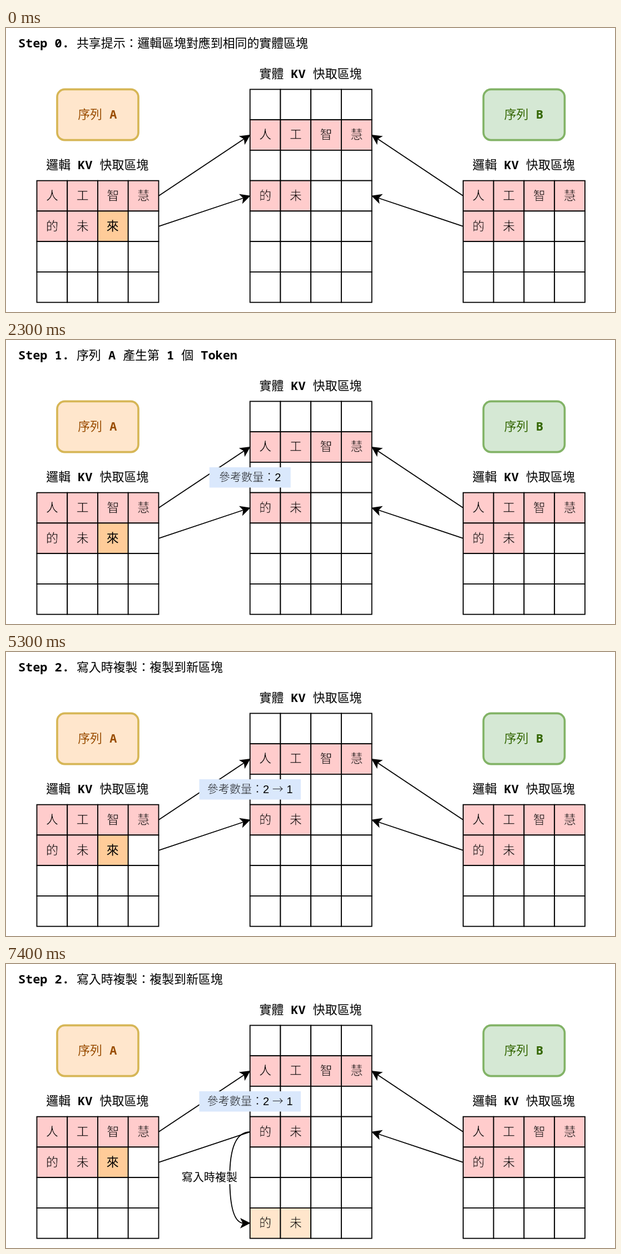
An HTML page for the animation above (8 s loop, 1095x511 px).

```html
<!DOCTYPE html>
<html lang="zh-Hant-TW">
<head>
<meta charset="utf-8">
<style>
  html, body { margin: 0; width: 100%; height: 100%; overflow: hidden; background: #fff; }
  svg { display: block; width: 1095px; height: 511px; }
  text { font: 400 24px 'Noto Sans CJK TC', 'Noto Sans CJK', sans-serif; white-space: pre; text-anchor: middle; }
  .small { font-size: 22px; }
  .start { text-anchor: start; }
  .thin { font-weight: 300; stroke-width: .6; }
  .thin tspan { font-family: 'Liberation Sans', sans-serif; stroke: none; }
  .bold tspan { font-family: 'Noto Sans Mono', monospace; font-weight: 700; }
</style>
</head>
<body>
<svg viewBox="0 0 1200 560"><g id="scene" transform="translate(.8 1)"></g></svg>
<script>
const CELL = 60;
const PINK = '#ffcccc', ORANGE = '#ffcc99', PEACH = '#ffe6cc', BLUE = '#dae8fc';

// y is the vertical middle; Latin runs get their own font
const text = (x, y, s, cls, paint) =>
  `<text x="${x}" y="${y + 7.4}" class="${cls}" ${paint}>` +
  s.replace(/[ -~]+/g, '<tspan>$&</tspan>') + '</text>';

const bold = (x, y, s, cls = '', color = '#000') =>
  text(x - .8, y, s, 'bold ' + cls, `fill="${color}"`);

// A hairline in the background colour lightens the strokes
const thin = (x, y, s, back, cls = '') =>
  text(x, y, s, 'thin ' + cls, `stroke="${back}"`);

const rect = (x, y, w, h, fill, more = '') =>
  `<rect x="${x}" y="${y}" width="${w}" height="${h}" fill="${fill}" ${more}/>`;

const path = (d, fill = 'none') =>
  `<path d="${d}" fill="${fill}" stroke="#000" stroke-width="2" stroke-miterlimit="10"/>`;

function grid(x, y, rows) {
  let boxes = '', words = '';
  rows.forEach(([chars, fill], r) => {
    for (let c = 0; c < 4; c++) {
      const ch = chars[c], left = x + c * CELL, top = y + r * CELL;
      const strong = ch === '來';
      boxes += rect(left, top, CELL, CELL, strong ? ORANGE : ch ? fill : '#fff',
        'stroke="#000" stroke-width="2"');
      if (ch) words += (strong ? bold : thin)(left + CELL / 2, top + CELL / 2, ch, strong ? '' : fill);
    }
  });
  return boxes + words;
}

function head(x, y, angle) {
  const deg = angle * 180 / Math.PI;
  return `<g transform="translate(${x} ${y}) rotate(${deg})">` +
    path('M-1.2 0L-17.2 8L-13.2 0L-17.2 -8Z', '#000') + '</g>';
}

function arrow(x1, y1, x2, y2) {
  const a = Math.atan2(y2 - y1, x2 - x1);
  return path(`M${x1} ${y1}L${x2 - 12 * Math.cos(a)} ${y2 - 12 * Math.sin(a)}`) + head(x2, y2, a);
}

const badge = (w, s) =>
  rect(480 - w / 2, 250, w, 40, BLUE) + thin(480, 270, s, BLUE, 'small');

const sequence = (x, name, fill, line, color) =>
  rect(x, 120, 160, 100, fill, `rx="15" stroke="${line}" stroke-width="4"`) +
  bold(x + 80, 170, name, '', color) +
  bold(x + 80, 270, '邏輯 KV 快取區塊');

const prompt = ['人工智慧', PINK], tail = ['的未', PINK], empty = [''];

const copyArrow =
  path('M300 390L480 330') +
  path('M480 330Q440 330 440 420Q440 510 468 510') + head(480, 510, 0) +
  rect(347, 407, 108, 26, '#fff') + bold(401, 420, '寫入時複製', 'small');

function scene(title, label, copied) {
  return bold(24, 30, title, 'start') +
    bold(600, 90, '實體 KV 快取區塊') +
    sequence(100, '序列 A', PEACH, '#d6b656', '#994c00') +
    sequence(940, '序列 B', '#d5e8d4', '#82b366', '#336600') +
    grid(60, 300, [prompt, ['的未來', PINK], empty, empty]) +
    grid(480, 120, [empty, prompt, empty, tail, empty, empty, copied ? ['的未', PEACH] : empty]) +
    grid(900, 300, [prompt, tail, empty, empty]) +
    arrow(300, 330, 480, 210) +
    arrow(900, 330, 720, 210) +
    arrow(900, 390, 720, 330) +
    (copied ? copyArrow : arrow(300, 390, 480, 330)) +
    label;
}

const copying = 'Step 2. 寫入時複製：複製到新區塊';
const lowered = badge(200, '參考數量：2 → 1');
const steps = [
  [0, scene('Step 0. 共享提示：邏輯區塊對應到相同的實體區塊', '')],
  [500, scene('Step 1. 序列 A 產生第 1 個 Token', badge(160, '參考數量：2'))],
  [3500, scene(copying, lowered)],
  [6500, scene(copying, lowered, true)]
];

const stage = document.getElementById('scene');
const start = performance.now();
let shown;

function draw() {
  const t = (performance.now() - start) % 8000;
  const step = steps.filter(([from]) => from <= t).pop();
  if (step !== shown) {
    shown = step;
    stage.innerHTML = step[1];
  }
  requestAnimationFrame(draw);
}
draw();
</script>
</body>
</html>
```
